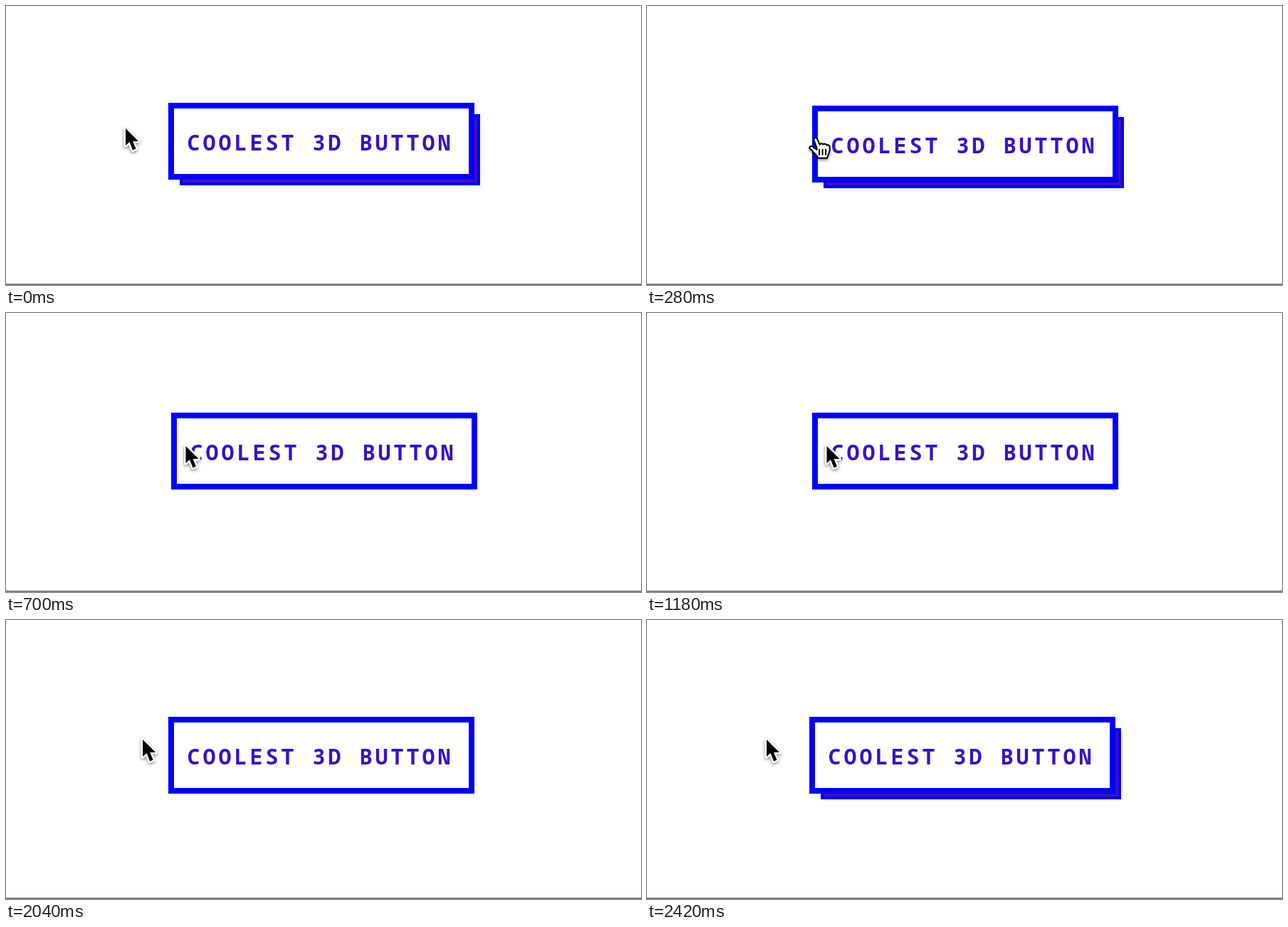
Write an HTML page that moves like this. It is 892x392 px and loops after 2.76 s.

```html
<!DOCTYPE html>
<html lang="en">
<head>
<meta charset="utf-8">
<title>3D button</title>
<style>
  html, body { margin: 0; width: 100%; height: 100%; overflow: hidden; background: #fff; }
  svg { display: block; }
  text { font: 600 30px "Noto Sans Mono", monospace; letter-spacing: 4px; fill: #3a10c8; }
  #cursor { filter: drop-shadow(0 2px 2px rgba(0, 0, 0, .45)); }
</style>
</head>
<body>
<svg width="892" height="392" viewBox="0 0 892 392">
  <rect y="390" width="892" height="2" fill="#808080"/>
  <g id="button">
    <rect id="shadow" x="234" y="142" width="418" height="96" fill="#3f10c0" stroke="#00f" stroke-width="4"/>
    <rect x="232" y="140" width="422" height="100" fill="#fff" stroke="#00f" stroke-width="8"/>
    <text x="254.5" y="202.5">COOLEST 3D BUTTON</text>
  </g>
  <g id="cursor" stroke-linejoin="round" stroke-linecap="round">
    <path id="arrow" d="M0 0V24L5.5 19L10 30.5L14.5 28.5L10 18H18Z" stroke="#fff" stroke-width="5" paint-order="stroke"/>
    <g id="hand" fill="#fff" stroke="#000" stroke-width="2">
      <path d="M4 16L0 5C-1 1 3 0 4.500 3L8 11C9 8.500 12.500 9 13 11C14 9 17.500 10 18 12C20 10.500 22 12 22 15V19C22 23 19 25 18.500 30H6C4 25 0 23 -3 19L-6 16.500C-7.500 13-3 12.500-1 14.500L4 18Z"/>
      <path d="M7.500 18V25M12 18V25M16.500 18V25" fill="none"/>
    </g>
  </g>
</svg>
<script>
const LOOP = 2760;
const [button, shadow, cursor, arrow, hand] =
  ["button", "shadow", "cursor", "arrow", "hand"].map(id => document.getElementById(id));

const mix = (a, b, p) => a + (b - a) * p;
const easeOut = (t, start, length) =>
  1 - (1 - Math.min(1, Math.max(0, (t - start) / length))) ** 1.4;
const move = (el, x, y) => el.setAttribute("transform", `translate(${x} ${y})`);
const show = (el, on) => el.setAttribute("visibility", on ? "visible" : "hidden");

function cursorAt(t) {
  if (t < 1840) {
    const p = easeOut(t, 80, 300);
    return [mix(168, 252.5, p), mix(172, 187, p)];
  }
  const p = easeOut(t, 1840, 340);
  return [mix(252.5, 168, p), mix(187, 168, Math.min(1, p * 1.4))];
}

// The shadow collapses and returns in hard 4px steps.
function shadowOffset(t) {
  if (t < 400 || t >= 2420) return 12;
  if (t < 600 || t >= 2240) return 8;
  return 4;
}

function draw(now) {
  const t = now % LOOP;
  const shift = t >= 250 && t < 1980 ? 4 : 0;
  const offset = shadowOffset(t);
  const pointing = t >= 250 && t < 340;
  move(button, shift, shift);
  move(shadow, offset, offset);
  move(cursor, ...cursorAt(t));
  show(arrow, !pointing);
  show(hand, pointing);
  requestAnimationFrame(draw);
}
draw(0);
</script>
</body>
</html>
```
